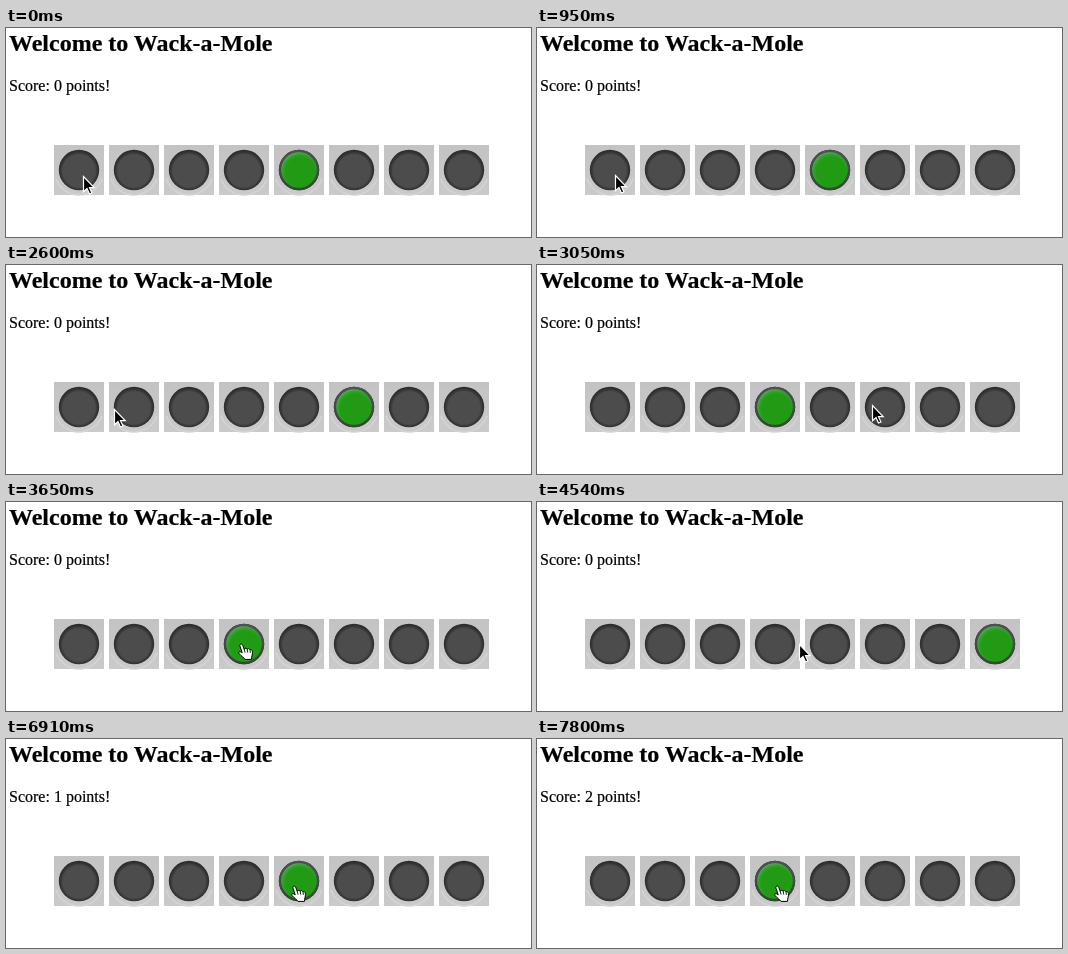
Write an HTML page that moves like this. It is 525 px wide and 209 px high and loops after 8 s.

```html
<!DOCTYPE html>
<html lang="en">
<head>
<meta charset="utf-8">
<title>Wack-a-Mole</title>
<style>
  html, body { margin: 0; width: 100%; height: 100%; overflow: hidden; background: #fff; }
  svg { display: block; width: 525px; height: 209px; }
  text { font-family: "Liberation Serif", "Times New Roman", serif; font-size: 16px; stroke: #000; stroke-width: .2px; }
  .title { font-size: 24px; font-weight: bold; }
</style>
</head>
<body>
<svg viewBox="0 0 525 209">
  <defs>
    <linearGradient id="plate" x2="0" y2="1">
      <stop offset="0" stop-color="#c3c3c3"/>
      <stop offset="1" stop-color="#cacaca"/>
    </linearGradient>
    <radialGradient id="dark" cy=".52">
      <stop offset=".8" stop-color="#4c4c4c"/>
      <stop offset=".9" stop-color="#383838"/>
      <stop offset="1" stop-color="#2c2c2c"/>
    </radialGradient>
    <linearGradient id="litRim" x2="0" y2="1">
      <stop offset="0" stop-color="#4c5452"/>
      <stop offset="1" stop-color="#3a423a"/>
    </linearGradient>
    <radialGradient id="lit" cx=".54" cy=".56" r=".58">
      <stop offset=".72" stop-color="#219a14"/>
      <stop offset=".88" stop-color="#30a52b"/>
      <stop offset="1" stop-color="#55b85c"/>
    </radialGradient>
    <g id="off">
      <rect x="-25" y="-25" width="50" height="50" fill="url(#plate)"/>
      <path d="M-23 9A24.5 24.5 0 0 0 23 9" fill="none" stroke="#d4d4d4" stroke-width="1.6"/>
      <circle r="20.2" fill="url(#dark)"/>
    </g>
    <g id="on">
      <circle r="20.2" fill="url(#litRim)"/>
      <circle r="17.8" fill="url(#lit)"/>
    </g>
  </defs>
  <text class="title" x="3" y="23">Welcome to Wack-a-Mole</text>
  <text id="score" x="3" y="63"></text>
  <g id="row"></g>
  <use id="lamp" href="#on" y="142"/>
  <path id="arrow" d="M.5 .6V15.8L4 12.6L6.5 18L8.9 17L6.5 11.7H11.2Z" stroke="#fff" stroke-width="1.2"/>
  <g id="hand" stroke="#000" stroke-linejoin="round" stroke-linecap="round">
    <path d="M-.9 9.5L-3 3.2C-3.7 1.1 -1.1 .2 -.3 2.2L1.2 6.2C1.6 4.9 3.5 4.9 4.1 6.2C4.8 5.2 6.5 5.4 7 6.8C8 6.2 9.3 6.9 9.4 8.6C9.7 11 8.6 13.4 8.4 16.4H2C.8 14.5 -1.6 13.3 -3.8 10.7C-4.9 9 -3.3 7.8 -2.2 8.8Z" fill="#fff"/>
    <path d="M1.2 6.2L2 9.2M4.1 6.2L4.7 9.2M7 6.8L7.3 9.4" stroke-width=".9"/>
  </g>
</svg>
<script>
  const LOOP = 8000, FIRST = 800, STEP = 148.9, BEAT = 993;
  const $ = id => document.getElementById(id);

  const moles = [4, 6, 5, 3, 7, 3, 4, 3];
  const clicks = [6900, 7790];
  const home = { x: 77, y: 148 };
  const glides = [
    { at: 700, dur: 830, x: 82, y: 144 },
    { at: 2480, dur: 540, x: 335, y: 140 },
    { at: 3060, dur: 410, x: 237, y: 141 },
    { at: 4410, dur: 555, x: 467, y: 147 },
    { at: 5270, dur: 369, x: 238, y: 141 },
    { at: 6380, dur: 220, x: 290, y: 146 },
    { at: 7260, dur: 350, x: 242, y: 146 }
  ];

  const clamp = u => Math.min(1, Math.max(0, u));
  const ease = u => u * u * (3 - 2 * u);
  const buttonX = i => 73 + 55 * i;
  const lampX = t => buttonX(moles[Math.max(0, Math.floor((t - 30) / BEAT))]);

  // The pointer becomes a hand when it comes to rest on a lit button.
  function pointer(t) {
    let { x, y } = home, hand = false;
    for (const g of glides) {
      if (t < g.at) break;
      const u = clamp((t - g.at) / g.dur), k = ease(u);
      x += (g.x - x) * k;
      y += (g.y - y) * k;
      hand = u === 1 && Math.abs(g.x - lampX(g.at + g.dur)) < 18;
    }
    return { x: Math.round(x), y: Math.round(y), hand };
  }

  $("row").innerHTML = moles.map((_, i) => `<use href="#off" x="${buttonX(i)}" y="142"/>`).join("");

  function draw(now) {
    // The picture advances in even steps, like a screen recording.
    const t = FIRST + Math.floor((now % LOOP - FIRST) / STEP) * STEP;
    const { x, y, hand } = pointer(t);
    $("lamp").setAttribute("x", lampX(t));
    $("score").textContent = `Score: ${clicks.filter(c => c <= t).length} points!`;
    $("hand").style.display = hand ? "" : "none";
    $("arrow").style.display = hand ? "none" : "";
    $(hand ? "hand" : "arrow").setAttribute("transform", `translate(${x} ${y})`);
  }

  function tick() {
    draw(performance.now());
    requestAnimationFrame(tick);
  }
  tick();
</script>
</body>
</html>
```
